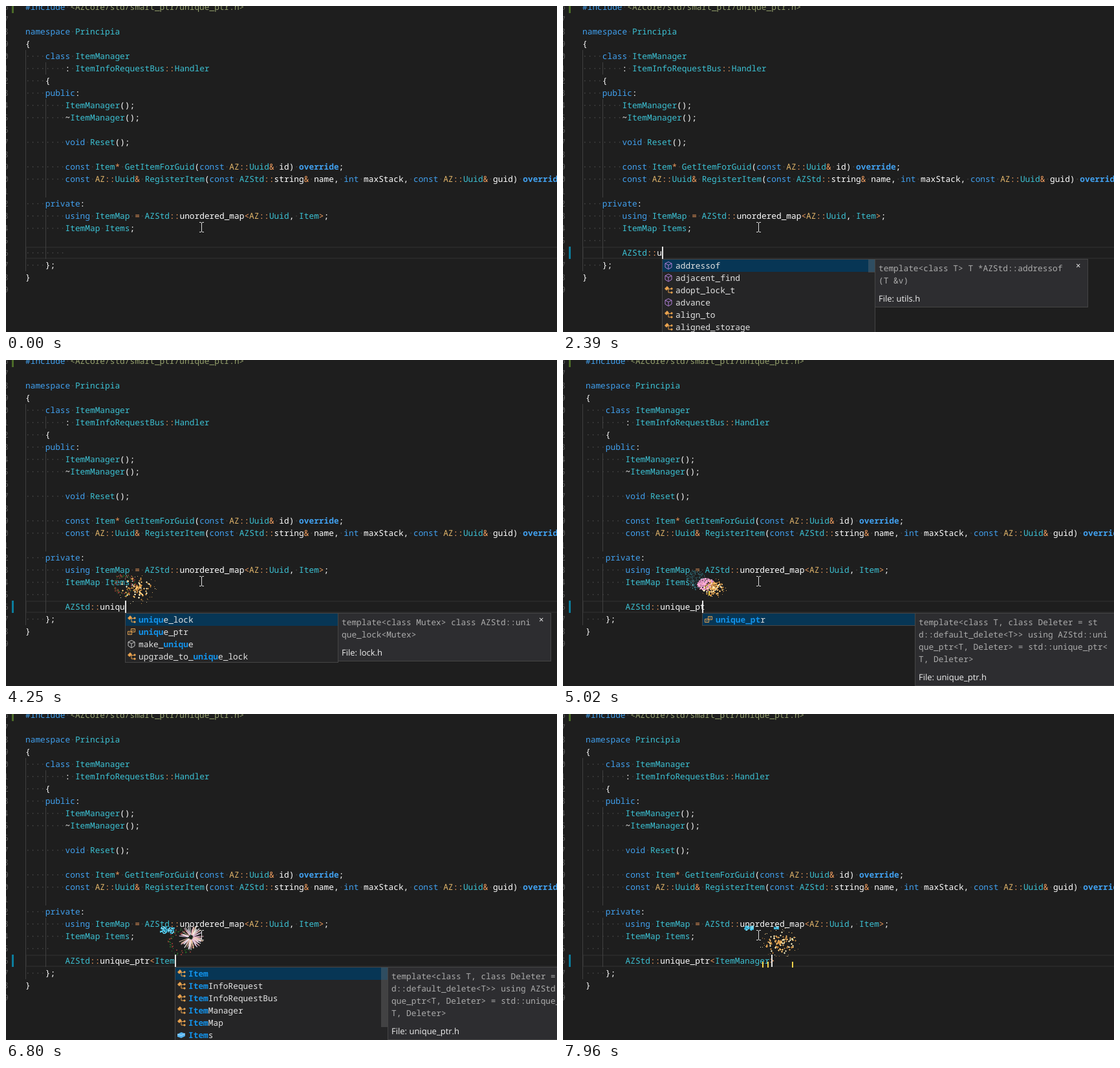
These frames come from a looping animation (852x504 px, 8 s). An HTML page with a canvas:

```html
<!DOCTYPE html>
<html lang="en">
<head>
<meta charset="utf-8">
<title>Typing with fireworks</title>
<style>
html, body { margin: 0; width: 100%; height: 100%; overflow: hidden; background: #1e1e1e; }
#stage { position: absolute; left: 0; top: 0; width: 852px; height: 504px; overflow: hidden; color: #fff;
  font: 500 12.828px/19px "Noto Sans Mono", "DejaVu Sans Mono", monospace; text-rendering: geometricPrecision; }
#stage div, #stage canvas, #stage > svg { position: absolute; }
.line, .num, .row, .doc div { white-space: pre; height: 19px; }
.line { left: 30px; }
.num { left: -4px; color: #5a5a5a; }
.guide { width: 1px; background: #404040; }
#current { left: 30px; top: 372px; width: 900px; height: 19px; box-sizing: border-box; border: 2px solid #282828; }
#caret { top: 372px; width: 2px; height: 19px; background: #e6e6e6; }
.bar { left: 9px; width: 3px; height: 19px; }
.k { color: #41a1f0 } .t { color: #3cc2d4 } .y { color: #e0b46a } .o { color: #f09c5e }
.b { color: #41a1f0; font-weight: bold } .s { color: #94a06c } .w { color: #484848 }
.list, .doc { top: 391px; width: 330px; box-sizing: border-box; border: 1px solid #454545; background: #252526; overflow: hidden; }
.doc { background: #2d2d30; color: #acacac; }
.row { left: 0; width: 328px; text-indent: 20px; color: #e4e4e4; }
.row.sel { background: #073655; }
.row svg { position: absolute; left: 2px; top: 2px; }
.row b { color: #1292ea; }
.slider { right: 0; top: 0; width: 10px; background: rgba(121,121,121,.35); }
#stage .doc .file { font: 13px/19px "Open Sans", "Noto Sans", sans-serif; color: #f0f0f0; }
</style>
</head>
<body>
<div id="stage">
  <div id="current"></div>
  <div id="guides"></div>
  <div id="gutter"></div>
  <div id="code"></div>
  <div id="caret"></div>
  <canvas id="sky" width="852" height="504"></canvas>
  <div id="popup"></div>
  <svg style="left:297px;top:333px" width="11" height="18" fill="none" stroke="#ddd">
    <path d="M2 1.5h2l1.5 1 1.5-1h2M5.500 2.500v13M2 16.500h2l1.500-1 1.500 1h2"/>
  </svg>
</div>
<script>
const LOOP = 8000, CW = 7.697, LINE = 19, TOP = -8, ROW = 20;
const $ = id => document.getElementById(id);

const source = `#include <AZCore/std/smart_ptr/unique_ptr.h>

namespace Principia
{
    class ItemManager
        : ItemInfoRequestBus::Handler
    {
    public:
        ItemManager();
        ~ItemManager();

        void Reset();

        const Item* GetItemForGuid(const AZ::Uuid& id) override;
        const AZ::Uuid& RegisterItem(const AZStd::string& name, int maxStack, const AZ::Uuid& guid) override;

    private:
        using ItemMap = AZStd::unordered_map<AZ::Uuid, Item>;
        ItemMap Items;


    };
}
`.split('\n');

const keys = [
  [530, 'A'], [680, 'Z'], [850, 'S'], [1000, 't'], [1220, 'd'], [1300, ':'], [1530, ':'],
  [2220, 'u'], [2460, 'n'], [2900, 'i'], [4100, 'q'], [4170, 'u'], [4400, 'e'], [4560, '_'],
  [4780, 'p'], [4940, 't'], [5090, 'r'], [5640, '<'], [6420, 'I'], [6500, 't'], [6570, 'e'],
  [6720, 'm'], [7000, 'M'], [7090, 'a'], [7340, 'n'], [7640, 'ager'], [7780, '>']
];

// Spans of time in which the text is pushed to the right
const shakes = [[1000, 1220], [2460, 2610], [2900, 3000], [3860, 3930], [4400, 4560], [4940, 5090],
  [5890, 6030], [6420, 6500], [7000, 7090], [7490, 7640], [7780, 8000]];

const spec = 'AZSTD_ADL_FIX_FUNCTION_SPEC_';
const lists = {
  az: { slider: 20, doc: ['AZStd'], file: 'unordered_map.h',
    rows: ['ns AZStd', 'def ' + spec + '1', 'def ' + spec + '1_2', 'def ' + spec + '1_2_RET',
      'def ' + spec + '1_RET', 'def ' + spec + '2'] },
  std: { slider: 20, doc: ['template<class T> T *AZStd::addressof', '(T &v)'], file: 'utils.h',
    rows: ['fn addressof', 'fn adjacent_find', 'cls adopt_lock_t', 'fn advance', 'cls align_to', 'cls aligned_storage'] },
  uni: { doc: ['template<class Mutex> class AZStd::uni', 'que_lock<Mutex>'], file: 'lock.h',
    rows: ['cls unique_lock', 'def unique_ptr', 'cube make_unique', 'cls upgrade_to_unique_lock'] },
  ptr: { doc: ['template<class T, class Deleter = st', 'd::default_delete<T>> using AZStd::uni',
      'que_ptr<T, Deleter> = std::unique_ptr<', 'T, Deleter>'], file: 'unique_ptr.h',
    rows: ['def unique_ptr'] },
  item: { slider: 92, file: 'unique_ptr.h',
    rows: ['cls Item', 'cls ItemInfoRequest', 'cls ItemInfoRequestBus', 'cls ItemManager', 'cls ItemMap', 'fld Items'] },
  itemMa: { doc: ['class Principia::ItemManager'], file: 'ItemManager.h', rows: ['cls ItemManager', 'cls ItemMap'] },
  itemMan: { doc: ['class Principia::ItemManager'], file: 'ItemManager.h', rows: ['cls ItemManager'] }
};
lists.item.doc = lists.ptr.doc;
const popups = [[0, ''], [600, 'az'], [1300, ''], [1530, 'std'], [2460, 'uni'], [4780, 'ptr'], [5640, ''],
  [6640, 'item'], [7000, 'itemMa'], [7340, 'itemMan'], [7640, '']];

const svg = body => `<svg width="15" height="15" fill="none">${body}</svg>`;
const cube = c => svg(`<path d="M7 1.500l5 2.500v6l-5 3-5-3v-6zM2 4l5 2.500 5-2.500M7 6.500v6" stroke="${c}"/>`);
const icons = {
  ns: svg('<path d="M5 2q-2 0-2 2v1.500q0 1.500-1.500 1.500 1.500 0 1.500 1.500v2q0 2 2 2M9 2q2 0 2 2v1.500q0 1.500 1.500 1.500-1.500 0-1.500 1.500v2q0 2-2 2" stroke="#ddd"/>'),
  def: svg('<path d="M6.500 2.500h6v5h-6zM1.500 6.500h6v5h-6zM8 5h3M3 9h3" stroke="#e0a050"/>'),
  cls: svg('<path d="M1 5l4-4 3 3-4 4zM10 5l2-2 2 2-2 2zM10 11l2-2 2 2-2 2z" fill="#e8a24e"/><path d="M6 5.500h5M7 6v5h4" stroke="#e8a24e"/>'),
  fn: cube('#b180d7'),
  cube: cube('#c5c5c5'),
  fld: svg('<path d="M1 6l6-3 6 2v4l-6 3-6-2z" fill="#55b3ee"/><path d="M1 6l6 2 6-3" stroke="#b5e0fa"/>')
};

const esc = s => s.replace(/&/g, '&amp;').replace(/</g, '&lt;');
const span = (cls, s) => `<span class="${cls}">${esc(s)}</span>`;
const dots = n => span('w', '·'.repeat(n));

const token = /(\b(?:namespace|class|public|private|void|const|using|int)\b)|(\boverride\b)|(\bAZ(?=::))|(\b[A-Z]\w*)|(::|[&*=<>])|( +)|(\w+|.)/g;
function paint(text) {
  if (text[0] === '#') return span('k', '#include') + dots(1) + span('s', text.slice(9));
  return text.replace(token, (m, key, bold, ns, type, op, gap) =>
    gap ? dots(m.length) : key ? span('k', m) : bold ? span('b', m) : ns ? span('y', m) :
    type ? span('t', m) : op ? span('o', m) : esc(m));
}

const lineTop = i => TOP + i * LINE;
$('code').innerHTML = source.map((s, i) => `<div class="line" style="top:${lineTop(i)}px">${paint(s)}</div>`).join('');
$('gutter').innerHTML = source.map((s, i) => `<div class="num" style="top:${lineTop(i)}px">${(i + 6) % 10}</div>`).join('') +
  '<div class="bar" style="top:-8px;background:#4b6a28"></div>' +
  '<div class="bar" id="edit" style="top:372px;background:#0c7d9d"></div>';
$('guides').innerHTML = [[30, 68, 410], [61, 87, 106], [61, 144, 296], [61, 315, 391]].map(([x, a, b]) =>
  `<div class="guide" style="left:${x}px;top:${a}px;height:${b - a}px"></div>`).join('');
const typedLine = $('code').children[ROW], blankLine = $('code').children[ROW - 1];

const typedAt = t => keys.filter(k => k[0] <= t).map(k => k[1]).join('');
const caretX = n => Math.round(30 + (8 + n) * CW);

function popupHtml(name, word, x) {
  const { rows, doc, file, slider } = lists[name];
  const items = rows.map((r, i) => {
    const [icon, label] = r.split(' ');
    const at = word ? label.toLowerCase().indexOf(word.toLowerCase()) : -1;
    const end = at + word.length;
    const text = at < 0 ? label : label.slice(0, at) + '<b>' + label.slice(at, end) + '</b>' + label.slice(end);
    return `<div class="row${i ? '' : ' sel'}" style="top:${i * LINE}px">${icons[icon]}${text}</div>`;
  }).join('');
  const lines = doc.map((s, i) => `<div style="left:5px;top:${4 + i * LINE}px">${esc(s)}</div>`).join('');
  const fileTop = 13 + doc.length * LINE;
  return `<div class="list" style="left:${x}px;height:${rows.length * LINE + 1}px">${items}` +
    (slider ? `<div class="slider" style="height:${slider}px"></div>` : '') + '</div>' +
    `<div class="doc" style="left:${x + 329}px;height:${fileTop + 24}px">${lines}` +
    `<div class="file" style="left:5px;top:${fileTop}px">File: ${file}</div>` +
    '<div class="file" style="left:310px;top:0">×</div></div>';
}

// start, x, y, radius, kind
const bursts = [
  [550, 115, 348, 20, 'gold'], [800, 117, 339, 15, 'cyan'], [850, 136, 346, 13, 'pink'], [960, 143, 331, 10, 'amber'],
  [1150, 145, 352, 27, 'gold'], [1290, 133, 344, 16, 'streak'], [1480, 150, 350, 20, 'speck'], [1600, 142, 338, 15, 'cyan'],
  [1740, 168, 346, 18, 'streak'], [2430, 150, 339, 15, 'cyan'], [2560, 172, 346, 13, 'pink'], [2700, 182, 352, 27, 'gold'],
  [2950, 178, 352, 22, 'speck'], [3190, 195, 352, 27, 'gold'], [3910, 182, 346, 18, 'speck'], [3990, 202, 352, 28, 'gold'],
  [4420, 195, 344, 17, 'streak'], [4600, 205, 339, 15, 'cyan'], [4780, 220, 346, 13, 'pink'], [4920, 232, 352, 28, 'gold'],
  [5160, 225, 346, 18, 'speck'], [5540, 258, 352, 28, 'gold'], [5930, 250, 345, 17, 'streak'], [6020, 232, 333, 10, 'azure'],
  [6200, 258, 352, 27, 'gold'], [6500, 270, 352, 21, 'speck'], [6550, 286, 345, 20, 'streak'], [6610, 250, 334, 12, 'azure'],
  [6960, 285, 352, 28, 'gold'], [7160, 275, 339, 15, 'cyan'], [7300, 300, 346, 13, 'pink'],
  [7720, 335, 352, 28, 'gold'], [7830, 288, 331, 8, 'azure'], [7830, 330, 331, 4, 'azure']
];
const LIFE = 500;
const rockets = [[1090, 140], [2620, 176], [4860, 226], [6120, 262], [7940, 309], [7940, 317], [7940, 355]];

const hues = {
  gold: ['#ffc670', '#fff0c0', '#d89848', '#b07838'], cyan: ['#58d0e4', '#3aa8bc', '#1e1e1e'],
  pink: ['#ffb0dc', '#f0a0cc', '#c880ac'], amber: ['#f0a840', '#ffc060'], azure: ['#4cc8ea', '#7cdaf2', '#2f9cc0'],
  speck: ['#2f8d36', '#1f6226', '#8a3a34'], streak: ['#fff', '#f4b8c4', '#e4d0f0', '#f4ccac']
};
const counts = { gold: 120, cyan: 420, pink: 240, amber: 70, azure: 90, speck: 110, streak: 70 };
const rnd = (i, s) => { const v = Math.sin(i * 12.9898 + s * 78.233) * 43758.5453; return v - Math.floor(v); };
const g = $('sky').getContext('2d');

function burst(t, [t0, x, y, r, kind], seed) {
  const p = (t - t0) / LIFE;
  if (p < 0 || p >= 1) return;
  const grow = 1 - (1 - Math.min(1, p / 0.5)) ** 2, fade = Math.min(1, (1 - p) / 0.35);
  const put = (px, py, w, h = w) => g.fillRect(Math.round(px), Math.round(py), w, h);
  g.lineWidth = 1.2;
  for (let i = 0; i < counts[kind]; i++) {
    const a = rnd(i, seed) * Math.PI * 2, d = rnd(i, seed + 1), pick = rnd(i, seed + 2);
    const c = Math.cos(a), s = Math.sin(a), R = r * grow;
    g.fillStyle = g.strokeStyle = hues[kind][Math.floor(pick * hues[kind].length)];
    g.globalAlpha = fade * (0.7 + 0.3 * rnd(i, seed + 3));
    if (kind === 'streak') {
      const far = R * (0.6 + 0.4 * d);
      g.beginPath();
      g.moveTo(x + c * far * 0.25, y + s * far * 0.25);
      g.lineTo(x + c * far, y + s * far);
      g.stroke();
    } else if (kind === 'gold') {
      const q = R * d ** 1.2, px = x + c * q * 1.15, py = y + s * q * 0.85 + p * 2;
      put(px, py, 1);
      if (d < 0.8) { put(px - 1, py, 3, 1); put(px, py - 1, 1, 3); }
      if (d < 0.15) put(px - 1, py - 1, 3);
    } else if (kind === 'amber' || kind === 'azure') {
      const side = i % 2 ? 1 : -1, q = R / 2 * Math.sqrt(d);
      put(x + side * r / 2 + c * q - 1, y + s * q - 1, 2);
    } else {
      const q = R * (kind === 'speck' ? 0.6 + 0.4 * d : Math.sqrt(d));
      put(x + c * q, y + s * q * (kind === 'pink' ? 0.7 : 1), kind === 'pink' || pick > 0.6 ? 2 : 1);
    }
  }
}

function sky(t) {
  g.clearRect(0, 0, 852, 504);
  bursts.forEach((b, i) => burst(t, b, i * 7 + 3));
  g.globalAlpha = 1;
  g.fillStyle = '#f2d24a';
  for (const [t0, x] of rockets) {
    const p = (t - t0) / 260;
    if (p >= 0 && p < 1) g.fillRect(x - 1, Math.round(387 - 48 * p), 2, 9 - Math.round(p * 4));
  }
}

let shown = '', shownText = null;
function draw(t) {
  const text = typedAt(t), x = caretX(text.length);
  if (text !== shownText) {
    shownText = text;
    typedLine.innerHTML = text ? '        ' + paint(text) : dots(8);
    blankLine.innerHTML = text ? dots(5) : '';
    $('edit').style.display = text ? '' : 'none';
    $('caret').style.left = x + 'px';
  }
  $('caret').style.visibility = t < 150 ? 'hidden' : 'visible';
  $('code').style.left = shakes.some(([a, b]) => t >= a && t < b) ? '5px' : '0';

  // The match marks trail the typing a little
  const name = popups.filter(p => p[0] <= t).pop()[1];
  const word = name === 'std' ? '' : typedAt(t - 75).split(/::|:|</).pop();
  const state = [name, word, x].join();
  if (state !== shown) {
    shown = state;
    $('popup').innerHTML = name ? popupHtml(name, word, x) : '';
  }
  sky(t);
}

const start = performance.now();
function tick() {
  draw((performance.now() - start) % LOOP);
  requestAnimationFrame(tick);
}
tick();
</script>
</body>
</html>
```
